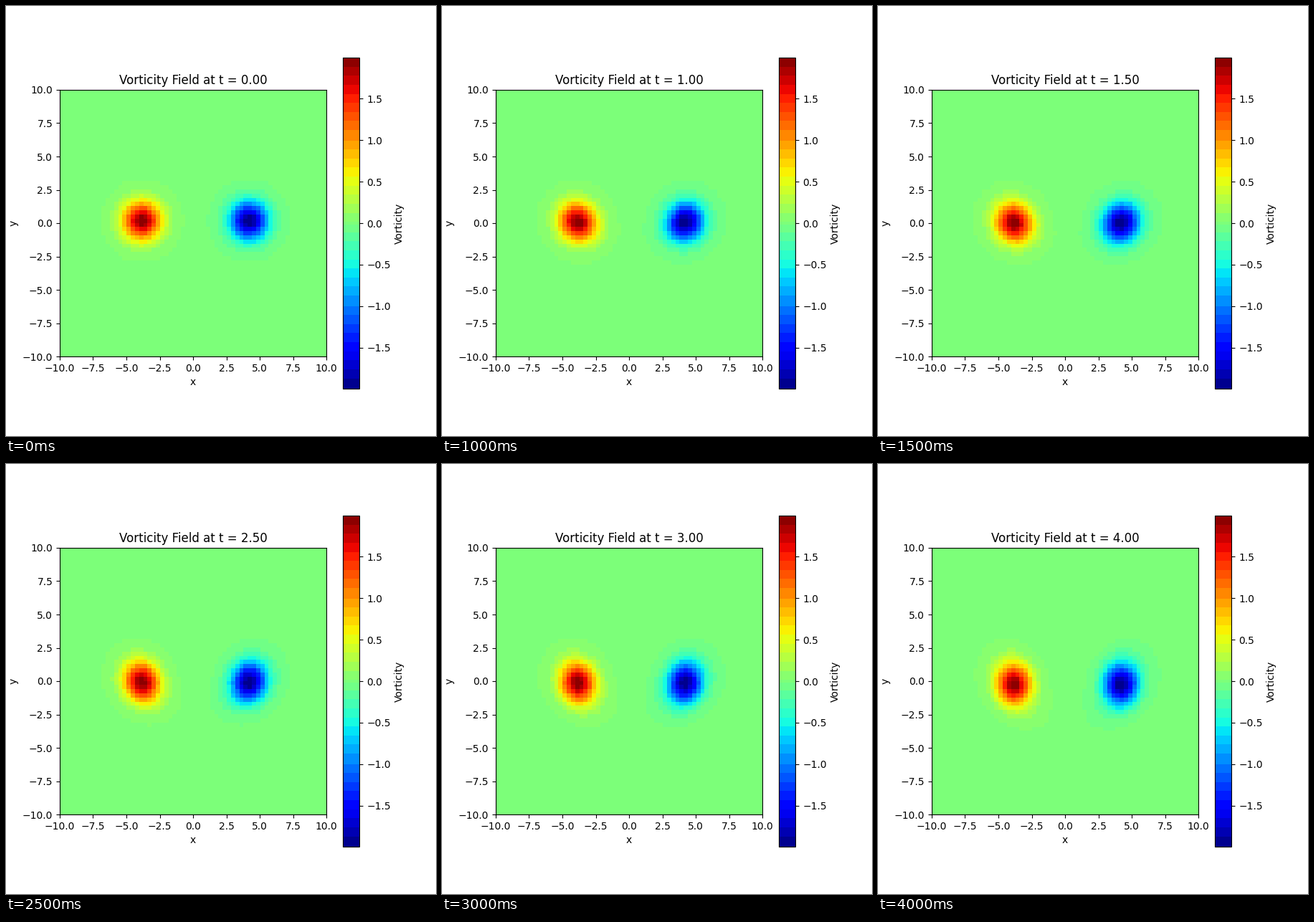
Recreate the animation shown at these times as a matplotlib script. Size 600 by 600 pixels, loop 4500 ms.

```python
import numpy as np
import matplotlib.pyplot as plt
from matplotlib.animation import FuncAnimation
from matplotlib.colors import ListedColormap

N, SIZE = 64, 20.0
FRAMES, FRAME_DT, SUBSTEPS = 9, 0.5, 20
BANDS = 36

# Periodic grid and spectral operators
axis = -SIZE / 2 + np.arange(N) * SIZE / N
X, Y = np.meshgrid(axis, axis)
k = 2 * np.pi * np.fft.fftfreq(N, SIZE / N)
KX, KY = np.meshgrid(k, k)
K2 = KX**2 + KY**2
K2[0, 0] = 1.0


def gauss(cx):
    return 2 * np.exp(-((X - cx) ** 2 + Y**2) / 2)


def inverse(f):
    return np.fft.ifft2(f).real


def rate(w):
    """Advection of vorticity by its own flow."""
    wh = np.fft.fft2(w)
    psi = -wh / K2
    u, v = inverse(1j * KY * psi), inverse(-1j * KX * psi)
    return -u * inverse(1j * KX * wh) - v * inverse(1j * KY * wh)


def rk4(w, dt):
    a = rate(w)
    b = rate(w + dt / 2 * a)
    c = rate(w + dt / 2 * b)
    d = rate(w + dt * c)
    return w + dt / 6 * (a + 2 * b + 2 * c + d)


def simulate():
    w = gauss(-4) - gauss(4)
    fields = [w]
    for _ in range(FRAMES - 1):
        for _ in range(SUBSTEPS):
            w = rk4(w, FRAME_DT / SUBSTEPS)
        fields.append(w)
    return fields


def banded_jet():
    """Jet in flat bands, with a narrow band of its own around zero."""
    index = np.arange(256)
    base = plt.get_cmap("jet")(index)
    band = index * BANDS // 256
    colors = np.array([base[band == b].mean(axis=0) for b in band])
    colors[127:129] = base[128]
    return ListedColormap(colors)


fields = simulate()
peak = np.abs(fields[0]).max()

fig, ax = plt.subplots(figsize=(6, 6), dpi=100)
image = ax.imshow(fields[0], extent=(-10, 10, -10, 10), origin="lower",
                  cmap=banded_jet(), vmin=-peak, vmax=peak)
fig.colorbar(image, ax=ax, label="Vorticity")
ax.set_xlabel("x")
ax.set_ylabel("y")
title = ax.set_title("")


def update(i):
    image.set_data(fields[i])
    title.set_text(f"Vorticity Field at t = {i * FRAME_DT:.2f}")
    return image, title


anim = FuncAnimation(fig, update, frames=FRAMES, interval=500, repeat=True,
                     repeat_delay=0)
plt.show()
```
